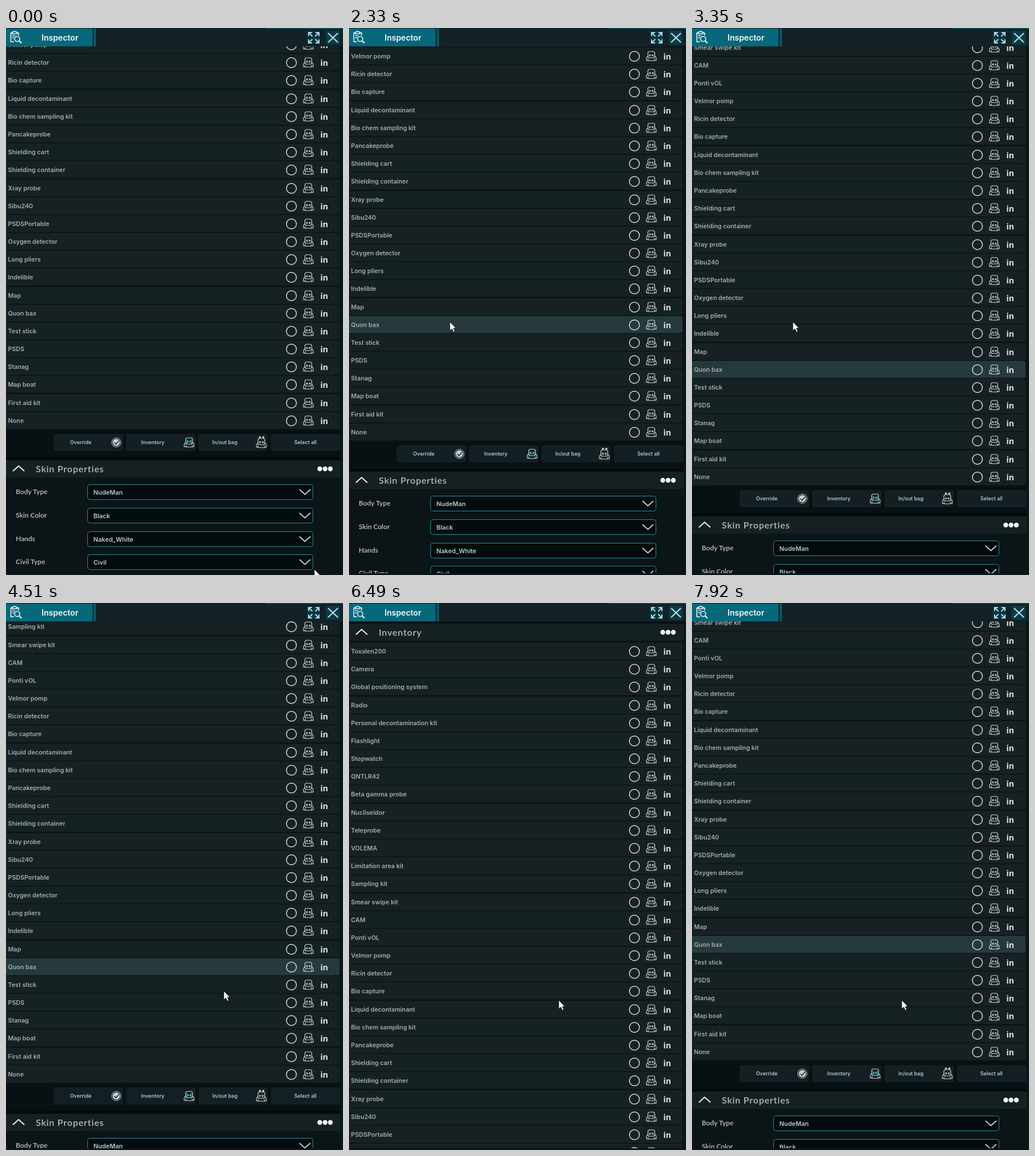
An HTML page for the animation above (7990 ms loop, 588 by 953 pixels).

```html
<!DOCTYPE html>
<html lang="en">
<head>
<meta charset="utf-8">
<title>Inspector</title>
<style>
  html, body { margin: 0; width: 100%; height: 100%; overflow: hidden; background: #060e10; }
  svg { display: block; }
  text { font-family: Inter, sans-serif; font-weight: 600; fill: #a3adad; white-space: pre; }
  .row rect { fill: #162124; }
  .row.hover rect { fill: #263a3d; }
  .row text { font-size: 10.7px; }
  .in { font: 700 14px "Open Sans", sans-serif; fill: #e4e8e8; }
  .name { font-size: 14px; fill: #f2f8f8; }
  .title { font: 600 16px Lato, sans-serif; letter-spacing: .8px; fill: #b4bcbd; }
  .label { font: 600 12px Lato, sans-serif; fill: #b9c7cc; }
  .value { font-size: 10.9px; fill: #b4cbd0; }
  .btn { font-size: 8.9px; fill: #b3c6cc; text-anchor: middle; }
  .line { fill: none; stroke: #d3dada; stroke-width: 1.1; }
</style>
</head>
<body>
<svg width="588" height="953" viewBox="0 0 588 953">
  <defs>
    <clipPath id="view"><rect y="32" width="588" height="918"/></clipPath>
    <g id="bag">
      <rect x="-5.5" y="-8" width="12" height="11" rx="3"/>
      <path d="M-6 0L-8 3V7.5H-5M7 0L9 3V7.5H6M-5 4.5V8H6V4.5"/>
      <circle cx="-2" cy="-1.5" r="1.2"/><circle cx="3" cy="-1.5" r="1.2"/>
    </g>
    <g id="tools">
      <circle cx="498" cy=".4" r="8.7" class="line" style="stroke-width:1.5"/>
      <use href="#bag" x="527" class="line"/>
      <text x="548.5" y="5.5" class="in">in</text>
    </g>
  </defs>

  <rect width="588" height="953" fill="#071113"/>
  <g clip-path="url(#view)"><g id="page"></g></g>
  <rect x="584" y="32" width="4" height="921" fill="#0a1718"/>
  <rect y="950" width="588" height="3" fill="#0b1618"/>

  <rect width="588" height="32" fill="#132226"/>
  <rect y="1" width="151" height="31" fill="#05687b"/>
  <rect x="153" y="1" width="4" height="31" fill="#07586a"/>
  <rect x="454" width="134" height="1.5" fill="#07515e"/>
  <g fill="none" stroke="#eef6f7" stroke-width="1.6">
    <path d="M14 24H8.5V8.5H11M19 8.5H22V13M11 7H13Q15 4 17 7H19V10H11ZM11 13.5H16M11 17H14"/>
    <circle cx="19.5" cy="19" r="4.5"/>
    <path d="M23 22.5L27 26.5" stroke-width="2.2"/>
  </g>
  <text x="62" y="22" class="name">Inspector</text>
  <rect x="525" y="6" width="23" height="22" fill="#073742"/>
  <path d="M528 14V8H534M540 8H546V14M546 20V26H540M534 26H528V20M528 8L534.5 14.5M546 8L539.5 14.5M546 26L539.5 19.5M528 26L534.5 19.5" fill="none" stroke="#b5d9df" stroke-width="2"/>
  <rect x="558" y="5" width="24" height="24" fill="#0a3c47"/>
  <path d="M562 9L579 25M579 9L562 25" stroke="#b5d9df" stroke-width="2.4"/>

  <path id="cursor" d="M0 0V15.2L3.6 12L6 17.6L8.6 16.4L6.2 11H10.6Z" fill="#fff" stroke="#111" stroke-width=".8"/>
</svg>

<script>
const LOOP = 7990, STEP = 70, NOTCH = 19.5, TOP = 30, PITCH = 31.18;
const HOVER_AT = 1640, HOVER_ROW = 32;

const items = `Toxalen200|Camera|Global positioning system|Radio|Personal decontamination kit
Flashlight|Stopwatch|QNTLR42|Beta gamma probe|Nucliseldor|Teleprobe|VOLEMA|Limitation area kit
Sampling kit|Smear swipe kit|CAM|Ponti vOL|Velmor pomp|Ricin detector|Bio capture
Liquid decontaminant|Bio chem sampling kit|Pancakeprobe|Shielding cart|Shielding container
Xray probe|Sibu240|PSDSPortable|Oxygen detector|Long pliers|Indelible|Map|Quon bax
Test stick|PSDS|Stanag|Map boat|First aid kit|None`.split(/[|\n]/);

const fields = [["Body Type", "NudeMan"], ["Skin Color", "Black"],
  ["Hands", "Naked_White"], ["Civil Type", "Civil"]];

// Wheel bursts: start, number of steps, notch reached
const bursts = [[2330, 3, 5], [2610, 4, 12], [3020, 3, 6], [3350, 1, 5], [4440, 11, 20],
  [5180, 5, 30], [5610, 4, 34], [6350, 3, 30], [6760, 2, 26], [7100, 3, 18],
  [7440, 3, 10], [7850, 2, 5]];

// Pointer moves: start, end, x, y
const moves = [[0, 490, 181, 493], [620, 900, 47, 498], [900, 1190, 182, 502],
  [1750, 1890, 169, 545], [1890, 2100, 176, 512], [3350, 4450, 380, 676], [4520, 4930, 366, 692]];

const $ = id => document.getElementById(id);
const page = $("page"), cursor = $("cursor");

const rect = (x, y, w, h, fill, more = "") =>
  `<rect x="${x}" y="${y}" width="${w}" height="${h}" fill="${fill}" ${more}/>`;
const text = (x, y, s, cls = "") => `<text x="${x}" y="${y}" class="${cls}">${s}</text>`;

const row = (name, i) =>
  `<g class="row" transform="translate(0 ${Math.round(84 + i * PITCH)})">
    <rect x="-3" y="-15" width="585" height="29.5" rx="3"/>
    ${text(3.5, 4, name)}<use href="#tools"/></g>`;

const header = (y, title) =>
  rect(0, y - 15, 584, 30, "#142022") +
  `<path d="M12 ${y + 4}L22 ${y - 5}L32 ${y + 4}" fill="none" stroke="#eef2f2" stroke-width="2"/>` +
  text(52, y + 5.5, title, "title") +
  [0, 1, 2].map(i => `<circle cx="${547.5 + i * 9.2}" cy="${y}" r="4.2" fill="#f4f6f6"/>`).join("");

const button = (label, i) =>
  rect(83 + i * 126.3, 1292, 121.5, 30, "#131f22", 'rx="4"') +
  text(i < 3 ? 130.5 + i * 125.7 : 522.5, 1310, label, "btn");

const field = ([label, value], i) => {
  const y = 1393 + Math.round(i * 40.8);
  return text(17, y + 4, label, "label") +
    rect(142.5, y - 12.5, 393, 26, "#020b0d", 'rx="4" stroke="#2a8d96"') +
    text(152.5, y + 4.5, value, "value") +
    `<path d="M512 ${y - 4}L521.5 ${y + 4.5}L531 ${y - 4}" fill="none" stroke="#c3d8dc" stroke-width="1.7"/>`;
};

page.innerHTML =
  header(51, "Inventory") +
  rect(0, 67, 584, 1218, "#0a1416") + items.map(row).join("") +
  rect(0, 1285, 584, 48, "#071012") +
  ["Override", "Inventory", "In/out bag", "Select all"].map(button).join("") +
  `<circle cx="192.5" cy="1307" r="8" fill="none" stroke="#c6d2d5"/>
   <circle cx="192.5" cy="1307" r="6.2" fill="#c6d2d5"/>
   <path d="M189 1307L192 1310L197 1304" fill="none" stroke="#16292d" stroke-width="1.6"/>
   <use href="#bag" x="319" y="1307" class="line"/>
   <path d="M315 1302L319.5 1305L324 1302V1309L319.5 1306L315 1309Z" fill="#2a98a0"/>
   <use href="#bag" x="445" y="1308" class="line"/>
   <path d="M441 1298H445M443 1296V1300M447 1298H451M449 1296V1300" stroke="#d3dada" stroke-width="1.4"/>` +
  rect(0, 1333, 584, 5, "#040a0c") + header(1353, "Skin Properties") +
  rect(0, 1368, 584, 300, "#0b1517") + fields.map(field).join("");

const hoverRow = page.querySelectorAll(".row")[HOVER_ROW];
const clamp = k => Math.min(1, Math.max(0, k));
const mix = (a, b, k) => a + (b - a) * k;
const smooth = k => k * k * (3 - 2 * k);

const notchAt = t => Math.floor(bursts.reduce((from, [start, count, to]) =>
  t < start ? from : mix(from, to, clamp((Math.floor((t - start) / STEP) + 1) / count)), 0));

function pointerAt(t) {
  const now = Math.floor(t / STEP) * STEP;
  return moves.reduce(([x, y], [start, end, x1, y1]) => {
    const k = smooth(clamp((now - start) / (end - start)));
    return [mix(x, x1, k), mix(y, y1, k)];
  }, [538, 943]).map(Math.round);
}

function draw(ms) {
  const t = (ms + 4) % LOOP;
  page.setAttribute("transform", `translate(0 ${Math.round((notchAt(t) - TOP) * NOTCH)})`);
  cursor.setAttribute("transform", `translate(${pointerAt(t)})`);
  hoverRow.classList.toggle("hover", t >= HOVER_AT);
}

let begin;
function tick(now) {
  begin ??= now;
  draw(now - begin);
  requestAnimationFrame(tick);
}
draw(0);
requestAnimationFrame(tick);
</script>
</body>
</html>
```
